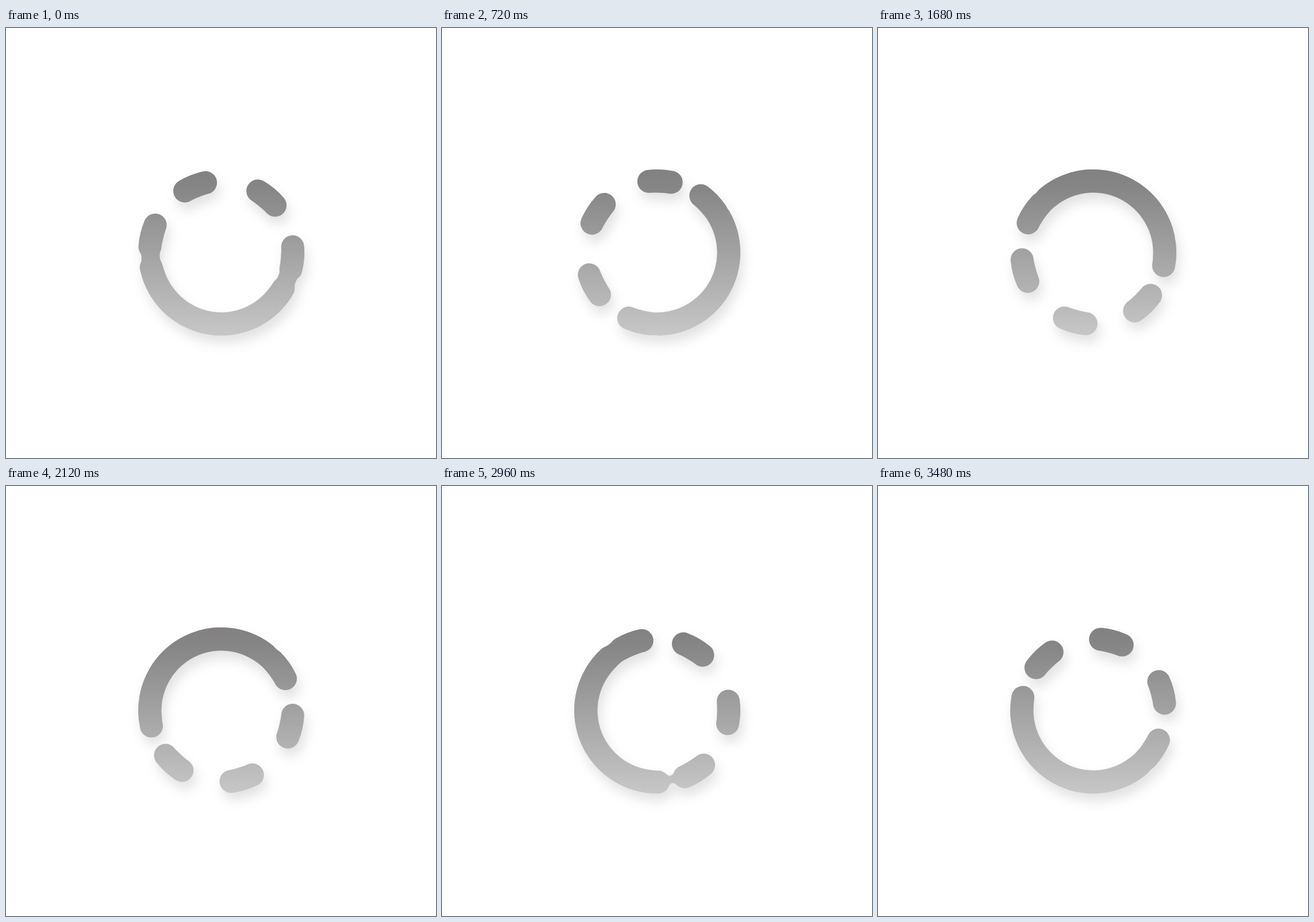
These frames come from a looping animation (748 px wide and 748 px high, 3520 ms). An HTML page:

```html
<!DOCTYPE html>
<html lang="en">
<head>
<meta charset="utf-8">
<title>Gooey loader</title>
<style>
  html, body { margin: 0; width: 100%; height: 100%; overflow: hidden; background: #fff; }
  svg { display: block; width: 748px; height: 748px; }
</style>
</head>
<body>
<svg viewBox="0 0 748 748">
  <defs>
    <linearGradient id="shade" gradientUnits="userSpaceOnUse" x1="0" y1="246" x2="0" y2="535">
      <stop offset="0" stop-color="#828080"/>
      <stop offset=".1" stop-color="#868585"/>
      <stop offset=".5" stop-color="#a2a2a2"/>
      <stop offset="1" stop-color="#c7c7c7"/>
    </linearGradient>
    <filter id="goo" filterUnits="userSpaceOnUse" x="0" y="0" width="748" height="748"
            color-interpolation-filters="sRGB">
      <feGaussianBlur stdDeviation="10"/>
      <feColorMatrix values="1 0 0 0 0  0 1 0 0 0  0 0 1 0 0  0 0 0 18 -8.5" result="bridges"/>
      <feMerge result="shape">
        <feMergeNode in="bridges"/>
        <feMergeNode in="SourceGraphic"/>
      </feMerge>
      <feGaussianBlur stdDeviation="10"/>
      <feOffset dx="5" dy="13"/>
      <feColorMatrix values="0 0 0 0 0  0 0 0 0 0  0 0 0 0 0  0 0 0 .115 0" result="shadow"/>
      <feMerge>
        <feMergeNode in="shadow"/>
        <feMergeNode in="shape"/>
      </feMerge>
    </filter>
  </defs>
  <g filter="url(#goo)">
    <path id="pills" fill="none" stroke="url(#shade)" stroke-width="40" stroke-linecap="round"/>
  </g>
</svg>
<script>
  const LOOP = 3520, STEP = 40;
  const CX = 374.5, CY = 390.5, R = 124.5;
  const PILLS = 11, SPAN = 18;
  const SLOT = 20;       // degrees between resting pills
  const STAGGER = 200;   // ms between two departures
  const LEAP = 140;      // degrees travelled in one leap
  const LEAP_TIME = 1000;
  const AXIS = 9;        // middle of the opening at the start

  const pills = document.getElementById('pills');

  const ease = x => {
    const u = Math.min(1, Math.max(0, x));
    return u * u * (3 - 2 * u);
  };

  // Angles run clockwise from the top.
  const point = deg => {
    const a = deg * Math.PI / 180;
    return (CX + R * Math.sin(a)).toFixed(2) + ' ' + (CY - R * Math.cos(a)).toFixed(2);
  };

  const arc = mid =>
    `M${point(mid - SPAN / 2)}A${R} ${R} 0 0 1 ${point(mid + SPAN / 2)}`;

  function draw(t) {
    const axis = AXIS - SLOT * t / STAGGER;
    const phase = (t / STAGGER + 0.5) % 1;
    let d = '';
    for (let i = 0; i < PILLS; i++) {
      const q = phase + i - (PILLS + 1) / 2;   // staggers past mid-leap
      const leap = LEAP * (ease(0.5 + q * STAGGER / LEAP_TIME) - 0.5);
      d += arc(axis + SLOT * q + leap);
    }
    pills.setAttribute('d', d);
  }

  const start = performance.now();
  function tick() {
    const t = (performance.now() - start) % LOOP;
    draw(Math.floor(t / STEP) * STEP);
    requestAnimationFrame(tick);
  }
  tick();
</script>
</body>
</html>
```
